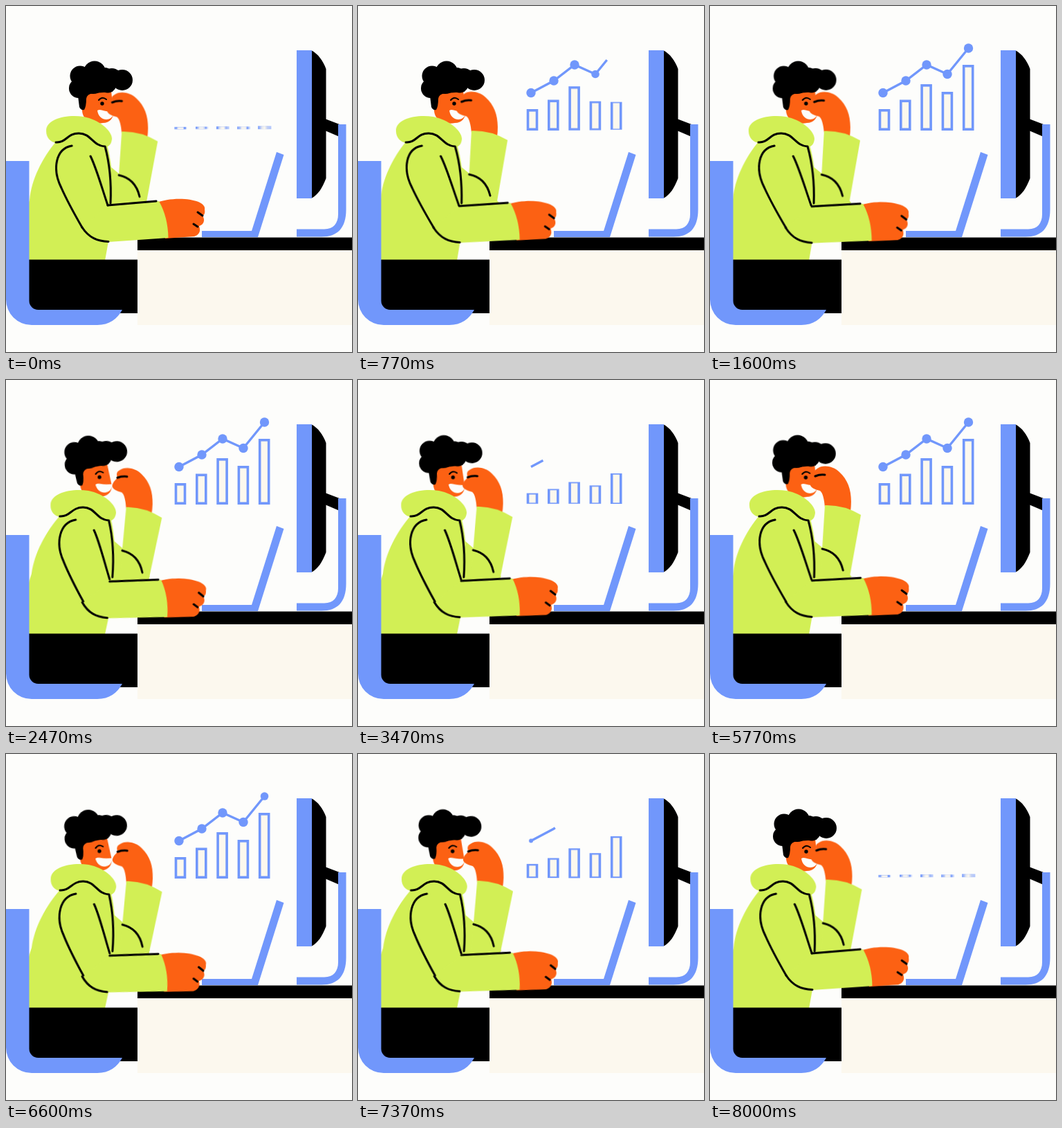
Animation, 500 px wide and 500 px high, one loop 8030 ms. Source, as an HTML page:

```html
<!DOCTYPE html>
<html lang="en">
<head>
<meta charset="utf-8">
<title>Working at a desk</title>
<style>
  html, body { margin: 0; width: 100%; height: 100%; overflow: hidden; background: #fdfdfb; }
  svg { display: block; width: 100vw; height: 100vh; }
  .blue { fill: #7197fb; }
  .green { fill: #d2ef55; }
  .skin { fill: #fc6113; }
  .cream { fill: #fcf8ee; }
  .ink { fill: none; stroke: #000; stroke-width: 3; stroke-linecap: round; stroke-linejoin: round; }
  .thin { stroke-width: 2; }

  .body, .raised, .forearm, .head { animation: 4015ms linear infinite; }
  .body { transform-origin: 0 366px; animation-name: lean; animation-delay: -3180ms; }
  .raised { transform-origin: 190px 285px; animation-name: raise; animation-delay: -3180ms; }
  .forearm { transform-origin: 110px 320px; animation-name: rest; }
  .head { transform-origin: 132px 175px; animation-name: nod; }

  @keyframes lean {
    0% { transform: skewX(.95deg); }
    9.1% { transform: skewX(.95deg); animation-timing-function: cubic-bezier(.6, 0, .4, 1); }
    47.7% { transform: skewX(-2.09deg); animation-timing-function: ease-in-out; }
    100% { transform: skewX(.95deg); }
  }
  @keyframes raise {
    0% { transform: translate(-1.9px, -.9px) rotate(-.6deg); }
    9.1% { transform: translate(-1.9px, -.9px) rotate(-.6deg); animation-timing-function: cubic-bezier(.6, 0, .4, 1); }
    47.7% { transform: translate(4px, 3.4px) rotate(1.7deg); animation-timing-function: ease-in-out; }
    100% { transform: translate(-1.9px, -.9px) rotate(-.6deg); }
  }
  @keyframes rest {
    0%, 100% { transform: translate(0, 0) rotate(0deg); }
    16.3% { transform: translate(0, .4px) rotate(1deg); }
    42% { transform: translate(0, .6px) rotate(1.7deg); }
    64.4%, 70% { transform: translate(-1.5px, 1.5px) rotate(2.9deg); }
    86.4% { transform: translate(-.8px, 1px) rotate(2deg); }
  }
  @keyframes nod {
    0% { transform: rotate(0deg); }
    32.4% { transform: rotate(0deg); animation-timing-function: cubic-bezier(.6, 0, .4, 1); }
    67.5% { transform: rotate(-6.7deg); animation-timing-function: cubic-bezier(.5, 0, .6, 1); }
    100% { transform: rotate(0deg); }
  }

  #chart rect { fill: #fcf8ee; stroke: #7197fb; stroke-width: 3.6; transform-box: fill-box; transform-origin: 50% 100%; }
  #chart circle { fill: #7197fb; transform-box: fill-box; transform-origin: center; }
  #chart polyline { fill: none; stroke: #7197fb; stroke-width: 3.4; stroke-dasharray: 1 2; }
</style>
</head>
<body>
<svg viewBox="0 0 500 500">
  <g id="chart"></g>

  <!-- monitor, laptop, desk -->
  <path d="M461 163L482 171V189L461 180Z"/>
  <path class="blue" d="M480 171H491.500V294C491.500 321 479 333.500 456 333.500H420V322.500H460C473 322.500 480 314 480 301Z"/>
  <path d="M441 64C451 69 458 79 462.500 91V249C457 263 451 273 441 278Z"/>
  <rect class="blue" x="420" y="64" width="22" height="214"/>
  <path class="blue" d="M283 325H355L391 211L401.500 215L364 334H283Z"/>
  <rect class="cream" x="190" y="352" width="310" height="109"/>
  <rect x="190" y="334.500" width="310" height="18.500"/>

  <g class="body">
    <path class="green" d="M73 195C52 220 37 250 34 280L28 300V368H143L148 340L205 284L164 243L152 233Q150 215 146 201L110 185Z"/>
  </g>

  <g class="head">
    <path class="skin" d="M111 124L152 122L155 152C156 162 150 169 140 169C125 172 110 165 110 150Z"/>
    <path fill="#fdfdfb" d="M132 151C137 148 140 153 155 153V157C151 168 134 166 132 151Z"/>
    <circle cx="107" cy="101" r="14.500"/>
    <circle cx="128" cy="95.500" r="16"/>
    <circle cx="105" cy="119" r="14"/>
    <circle cx="126" cy="109" r="18"/>
    <circle cx="143" cy="101" r="12"/>
    <circle cx="153" cy="104" r="14"/>
    <circle cx="147" cy="113" r="12.500"/>
    <circle cx="168" cy="107" r="15"/>
    <path d="M103 122L106 146Q108 151 113 150Q116 145 116 134Q117 127 126 126L154 124V110H110Z"/>
    <circle cx="139" cy="141" r="2.700"/>
    <path class="ink thin" d="M134 136Q139 130 145 135"/>
  </g>

  <g class="body">
    <path class="green" d="M58 181C57 163 88 156 112 160C134 164 153 180 153 192C152 202 146 206 138 202L105 195L73 198C64 197 58 190 58 181Z"/>
    <path class="ink" d="M72 197C87 198 88 184 105 184C123 184 125 202 143 203Q153 240 151 285"/>
  </g>

  <g class="raised">
    <path class="skin" d="M167 184C166 172 164 163 160 160C152 158 145 155 146 150C147 144 152 142 153 138C151 134 152 130 156 128C164 122 179 124 188 133C203 147 207 165 204 190Z"/>
    <path class="ink" d="M153 139Q160 136 167 137"/>
    <path class="green" d="M167 181Q194 180 219 195L202 288H160L163 243Z"/>
    <path class="ink" d="M163 244Q187 249 193 275"/>
  </g>

  <!-- chair and trousers -->
  <path d="M33 366.500H190V444H160L33 440Z"/>
  <path class="blue" d="M0 224H33.500V426A13 13 0 0 0 46.500 439H168C161 452 149 461 132 461H37A37 37 0 0 1 0 424Z"/>

  <g class="body">
    <g class="forearm">
      <path class="skin" d="M215 285C235 277 262 277 278 283C284 286 288 289 287 294C288 300 286 302 284 303C288 309 286 316 279 318C282 325 279 331 272 333L230 336Z"/>
      <path class="ink" d="M277 298L284 303M271 315L277 319"/>
      <path class="green" d="M147 288L221 282Q234 305 234.500 335L148 341C130 341 118 334 110 320Z"/>
      <path class="ink" d="M147 288L217 282M110 320C120 335 132 340 148 340.500"/>
    </g>
    <path class="ink" d="M95 202C72 206 66 235 80 263C88 281 99 301 110 320M122 217C130 233 137 258 147 288"/>
  </g>
</svg>
<script>
  const CYCLE = 4015;
  const chart = document.getElementById('chart');

  function add(tag, attrs) {
    const el = document.createElementNS('http://www.w3.org/2000/svg', tag);
    for (const key in attrs) el.setAttribute(key, attrs[key]);
    return chart.appendChild(el);
  }

  // Goes from low to high between in0 and in1, and back between out0 and out1.
  function inOut(el, prop, low, high, [in0, in1, out0, out1], easing) {
    const key = (time, value) => ({ offset: time / CYCLE, [prop]: value, easing });
    el.animate(
      [key(0, low), key(in0, low), key(in1, high), key(out0, high), key(out1, low), key(CYCLE, low)],
      { duration: CYCLE, iterations: Infinity }
    );
  }

  const barTops = [149, 135.5, 113, 124, 85];
  barTops.forEach((top, i) => {
    const height = 180 - top;
    const bar = add('rect', { x: 245.5 + i * 30.3, y: top + 1.8, width: 13, height: height - 3.6 });
    const low = 0.02 + 3 / height;
    const start = i * 125;
    inOut(bar, 'transform', `scaleY(${low})`, 'scaleY(1)', [start, start + 620, 2890, 3970], 'ease-in-out');
  });

  const points = [[250, 125.5], [283, 108], [313, 85], [343, 98.5], [373.5, 61]];
  const line = add('polyline', { points: points.join(' '), pathLength: 1 });
  inOut(line, 'strokeDashoffset', '1', '0', [100, 880, 2680, 3585], 'linear');

  const reach = [0];
  for (let i = 1; i < points.length; i++) {
    const [[x0, y0], [x1, y1]] = [points[i - 1], points[i]];
    reach.push(reach[i - 1] + Math.hypot(x1 - x0, y1 - y0));
  }
  points.forEach(([cx, cy], i) => {
    const share = reach[i] / reach[4];
    const show = 120 + 780 * share;
    const hide = 2540 + 720 * (1 - share);
    const dot = add('circle', { cx, cy, r: 6.7 });
    inOut(dot, 'transform', 'scale(0)', 'scale(1)', [show, show + 150, hide, hide + 180], 'ease-in-out');
  });
</script>
</body>
</html>
```
